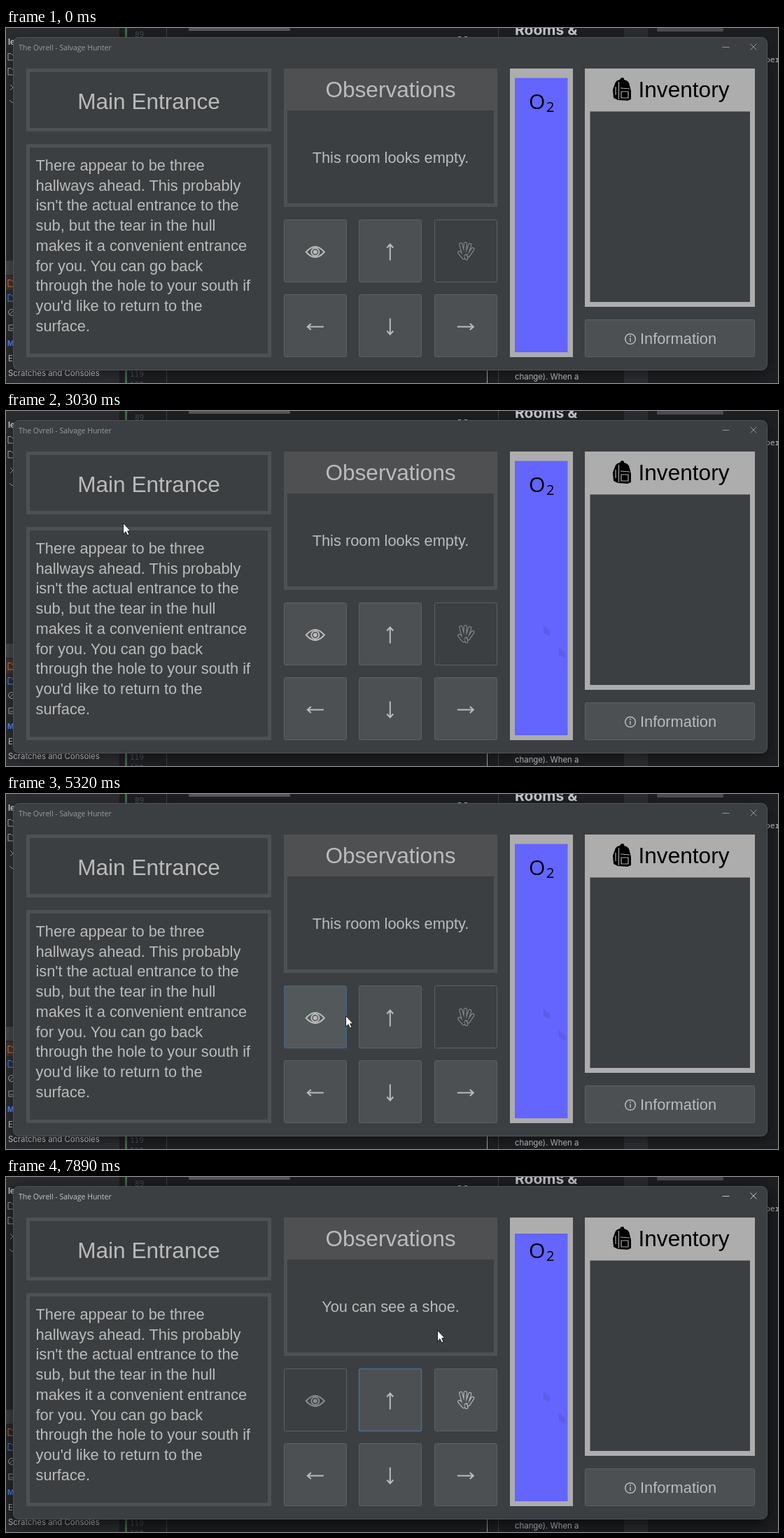
Animation of 1103x508 px, one loop 8000 ms. Source, as an HTML page:

```html
<!DOCTYPE html>
<html lang="en">
<head>
<meta charset="utf-8">
<title>Adventure window</title>
<style>
html, body { margin: 0; width: 100%; height: 100%; overflow: hidden; background: #1e1f22; }
svg { display: block; width: 1103px; height: 508px; }
text { font-family: "Liberation Sans", Arial, sans-serif; fill: #bbb; white-space: pre; }
.big { font-size: 31.6px; }
.mid { font-size: 21.8px; }
.center { text-anchor: middle; }
.black { fill: #000; }
.gas { font-family: "Open Sans", sans-serif; }
.ide text { font-family: Inter, sans-serif; font-size: 11.4px; fill: #c4c7cb; }
.ide .num { font-family: "Noto Sans Mono", monospace; font-size: 11px; fill: #4b5059; }
.thin { fill: none; stroke: #a9abae; stroke-width: 1; }
#win { fill: #3c3f41; stroke: #505355; filter: drop-shadow(0 5px 9px rgba(0,0,0,.4)); }
#title { font: 10.5px "Open Sans", sans-serif; fill: #999b9c; }
.ctl { fill: none; stroke: #939596; }
.active #win { filter: drop-shadow(0 6px 13px rgba(0,0,0,.7)); }
.active #title { fill: #c3c5c6; }
.active .ctl { stroke: #c3c5c6; }
.active #row { display: none; }
.frame { fill: #3c3f41; stroke: #4e5052; stroke-width: 5; }
.btn { --face: #4c5052; --edge: #5e6060; --ink: #bbb; }
.btn rect { fill: var(--face); stroke: var(--edge); }
.btn g { fill: none; stroke: var(--ink); stroke-width: 2; }
.btn .solid { fill: var(--ink); stroke: none; }
.btn .outer { stroke-width: 5.2; stroke-linecap: round; }
.btn .inner { stroke: var(--face); stroke-width: 3; stroke-linecap: round; }
.btn.off { --face: #3c3f41; --ink: #87898a; }
.btn.hover { --face: #53585b; --edge: #40658a; }
.btn.press { --face: #5c6164; }
.btn.focus { --edge: #466d94; }
.btn.focus rect { stroke-width: 1.5; }
.ghost { fill: #4e4eb4; opacity: .35; }
</style>
</head>
<body>
<svg id="stage" viewBox="0 0 1103 508">
  <defs>
    <path id="folder" d="M0 1.5H4L6 3.5H11V11H0Z"/>
    <path id="smudge" d="M0 0L9 8V15L5 13 0 11Z"/>
  </defs>

  <g class="ide">
    <rect width="1103" height="508" fill="#1e1f22"/>
    <rect width="163" height="508" fill="#2b2d30"/>
    <rect x="162" width="1" height="508" fill="#1a1b1d"/>
    <rect x="170" width="3" height="508" fill="#436a4c"/>
    <path class="thin" stroke-opacity=".25" d="M229.5 0V508M703.5 0V508"/>
    <rect x="883" width="34" height="508" fill="#2b2d30"/>
    <rect x="261" width="145" height="4" rx="1.5" fill="#55575a"/>
    <rect x="930" width="95" height="5" rx="1.5" fill="#4b4d50"/>
    <text class="num" x="184" y="13">89</text>
    <text class="num" x="177" y="499">119</text>
    <text class="num" x="177" y="514">120</text>
    <path class="thin" d="M646 12.5h4m5 0h4M687.5 489V508"/>
    <text x="727" y="9.5" style="font-size:21px;font-weight:700">Rooms &amp;</text>
    <text x="727" y="503">change). When a</text>
    <text x="1085" y="49" style="font-family:'Noto Sans Mono',monospace">per</text>

    <rect y="333" width="162" height="20" fill="#43454a"/>
    <rect id="row" y="355" width="162" height="20" fill="#45322b"/>
    <text x="3" y="24" style="font-weight:700">le</text>
    <g class="thin">
      <use href="#folder" x="3" y="35"/>
      <use href="#folder" x="3" y="56"/>
      <use href="#folder" x="3" y="359" stroke="#c77d55"/>
      <use href="#folder" x="3" y="380" stroke="#548af7"/>
      <path d="M6 81l4 4-4 4M5 103l4 4 4-4M4 425h8v8H4ZM6 430h4M5 410l6-6"/>
      <circle cx="8" cy="407" r="4.5"/>
    </g>
    <text x="2" y="455" style="font-size:10px;font-weight:700;fill:#548af7">M</text>
    <text x="3" y="477">E</text>
    <text x="3" y="498">Scratches and Consoles</text>
  </g>

  <rect id="win" x="10.5" y="13.5" width="1077" height="476" rx="8"/>
  <text id="title" x="18" y="31.5">The Ovrell - Salvage Hunter</text>
  <path class="ctl" d="M1023.5 27.5h10M1063.5 22.5l9 9m0-9l-9 9"/>

  <rect class="frame" x="31.5" y="60.5" width="345" height="85"/>
  <text class="big center" x="204" y="116">Main Entrance</text>

  <rect class="frame" x="31.5" y="168.5" width="345" height="300"/>
  <text id="story" class="mid"></text>

  <rect x="397" y="58" width="305" height="198" fill="#4e5052"/>
  <rect x="402" y="118" width="295" height="133" fill="#3c3f41"/>
  <text class="big center" x="549.5" y="99">Observations</text>
  <text id="seen" class="mid center" x="549.5" y="193"></text>

  <g id="pad"></g>

  <rect x="720" y="58" width="90" height="413" fill="#adadad"/>
  <rect id="air" x="727" width="75.500" fill="#6464ff"/>
  <use id="smudge1" class="ghost" href="#smudge" x="790" y="338"/>
  <use id="smudge2" class="ghost" href="#smudge" x="768" y="307"/>
  <text class="gas black" x="747" y="115.500" font-size="30">O</text>
  <text class="gas black" x="772" y="120" font-size="20">2</text>

  <rect x="827" y="58" width="243" height="341" fill="#adadad"/>
  <rect x="834.500" y="119.500" width="228.500" height="272.500" fill="#3c3f41"/>
  <text class="big black" x="903.500" y="99">Inventory</text>
  <path d="M870 80Q871 75 877 74Q879 69 883 72V74Q890 75 891 82L893 90V102L888 104 874 103 868 100 867 88Z"/>
  <path d="M875.500 77V102M878 86l13 1M879 91h10v9h-10ZM871 84v12" fill="none" stroke="#adadad" stroke-width="1.200"/>

  <g id="info" class="btn">
    <rect x="827.500" y="417.500" width="242" height="53" rx="2"/>
    <g style="stroke-width:1.500">
      <circle cx="892" cy="445" r="7.300"/>
      <path d="M892 443.500v5.500M892 440v2"/>
    </g>
    <text class="mid" x="906" y="452">Information</text>
  </g>

  <path id="cursor" d="M.5.500V16L4 12.700 6.500 18 9 17 6.700 11.700H11Z" fill="#fff" stroke="#111" stroke-width=".9"/>
</svg>

<script>
const LOOP = 8000, CLICK = 6560, RESULT = 6600, STEP = 69;
const $ = id => document.getElementById(id);

const story = `There appear to be three
hallways ahead. This probably
isn't the actual entrance to the
sub, but the tear in the hull
makes it a convenient entrance
for you. You can go back
through the hole to your south if
you'd like to return to the
surface.`;
$("story").innerHTML = story.split("\n")
  .map((s, i) => `<tspan x="42.5" y="${204 + i * 28.7}">${s}</tspan>`).join("");

// Button pad: icons are drawn around their own centre.
const arrow = turn => `<path transform="rotate(${turn})" d="M0 12V-11M-4.5-6L0-11 4.5-6"/>`;
const fingers = '<path d="M-3 4L-7-11M-1 2L-.5-12M2 2L6-10M4 5L10-4M-3 8L-9 1M0 6L1 9"/>';
const pad = [
  ["eye", '<path d="M-13 0Q0-15 13 0Q0 15-13 0Z"/><circle r="5.5"/><circle class="solid" r="3"/>'],
  ["north", arrow(0)],
  ["hand", `<g class="outer">${fingers}</g><g class="inner">${fingers}</g>`],
  ["west", arrow(-90)],
  ["south", arrow(180)],
  ["east", arrow(90)]
];
$("pad").innerHTML = pad.map(([id, icon], i) => {
  const x = Math.floor(397 + i % 3 * 107.6), y = i < 3 ? 274 : 381;
  return `<g id="${id}" class="btn" transform="translate(${x} ${y})">
    <rect x=".5" y=".5" width="89" height="89" rx="2"/>
    <g transform="translate(44.8 46.5)">${icon}</g></g>`;
}).join("");

// Each move runs from the previous resting place through evenly timed points.
const moves = [
  { start: 330, end: 730, via: [[930, 420], [813, 372]] },
  { start: 1060, end: 1830, via: [[748, 279], [555, 200], [463, 187], [598, 205]] },
  { start: 2090, end: 2560, via: [[417, 197], [522, 205]] },
  { start: 2890, end: 3650, via: [[167, 160], [68, 111], [110, 114], [172, 129]] },
  { start: 3720, end: 4080, via: [[355, 151]] },
  { start: 4340, end: 5110, via: [[385, 245], [417, 306], [490, 319]] },
  { start: 5180, end: 5850, via: [[466, 312]] },
  { start: 7260, end: 7890, via: [[540, 232], [616, 219]] }
];
let rest = [1122, 500];
for (const m of moves) {
  m.points = [rest, ...m.via];
  rest = m.via.at(-1);
}

// Catmull-Rom curve through the points, u from 0 to 1.
function along(points, u) {
  const last = points.length - 1;
  const i = Math.min(Math.floor(u * last), last - 1), f = u * last - i;
  const at = n => points[Math.max(0, Math.min(last, n))];
  const [a, b, c, d] = [at(i - 1), at(i), at(i + 1), at(i + 2)];
  return [0, 1].map(n => b[n] + f / 2 * (c[n] - a[n]
    + f * (2 * a[n] - 5 * b[n] + 4 * c[n] - d[n]
    + f * (3 * (b[n] - c[n]) + d[n] - a[n]))));
}

function cursorAt(t) {
  const m = moves.findLast(m => m.start <= t);
  if (!m) return null;
  const steps = Math.round((m.end - m.start) / STEP);
  const step = Math.floor((t - m.start) / (m.end - m.start) * steps + 0.03);
  return along(m.points, Math.min(1, (step + 1) / (steps + 1))).map(Math.round);
}

const inside = (p, x, y, w, h) => !!p && p[0] >= x && p[0] < x + w && p[1] >= y && p[1] < y + h;
const show = (id, on) => { $(id).style.display = on ? "" : "none"; };
const flag = (id, name, on) => $(id).classList.toggle(name, on);

function draw(t) {
  const p = cursorAt(t), done = t >= RESULT;
  show("cursor", p);
  if (p) $("cursor").setAttribute("transform", `translate(${p})`);

  flag("stage", "active", t >= CLICK);
  flag("eye", "hover", !done && inside(p, 397, 274, 90, 90));
  flag("eye", "press", t >= CLICK && !done);
  flag("eye", "off", done);
  flag("hand", "off", !done);
  flag("north", "focus", done);
  flag("info", "hover", inside(p, 827, 417, 243, 54));

  $("seen").textContent = done ? "You can see a shoe." : "This room looks empty.";
  const top = done ? 81 : 71.5;
  $("air").setAttribute("y", top);
  $("air").setAttribute("height", 464 - top);
  show("smudge1", t >= 1130);
  show("smudge2", t >= 1200);
}

const begin = performance.now();
function tick() {
  draw((performance.now() - begin) % LOOP);
  requestAnimationFrame(tick);
}
tick();
</script>
</body>
</html>
```
